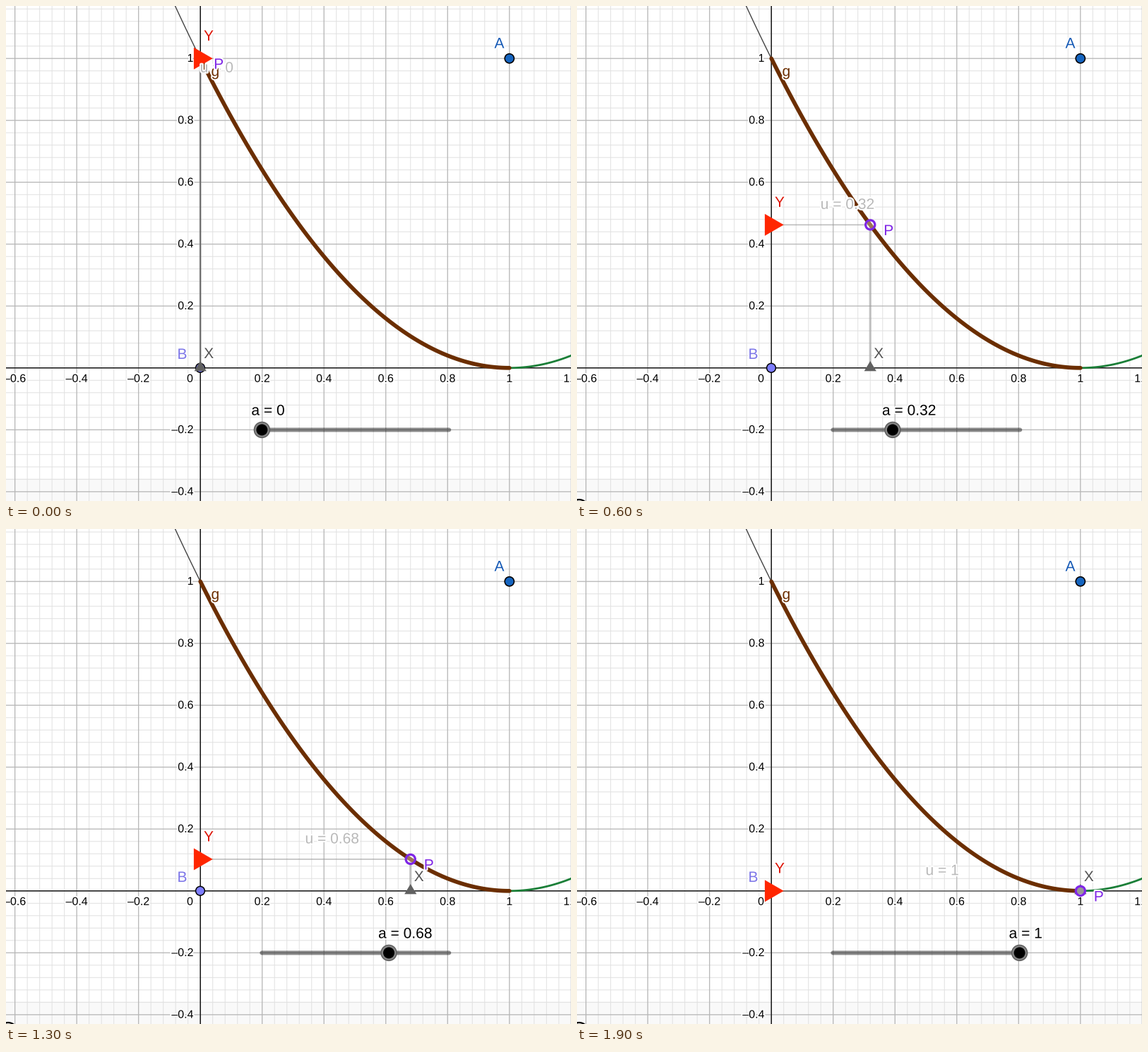
Animation of 800 by 700 pixels, one loop 2 s. Source, as a matplotlib script:

```python
import numpy as np
import matplotlib.pyplot as plt
from matplotlib.animation import FuncAnimation
from matplotlib.patches import Circle, Polygon, Rectangle
from matplotlib.patheffects import withStroke

W, H, DPI = 800, 700, 100
PT = 72 / DPI                        # points per pixel
X0, Y0, UNIT = 275.2, 511.8, 437.6   # origin and scale in pixels
RAIL_Y = 599.4
FRAMES, INTERVAL = 20, 100
BROWN, PURPLE, GREY = "#6b2e00", "#7f26e6", "#616161"

plt.rcParams["font.family"] = "Liberation Sans"
plt.rcParams["text.hinting"] = "none"

fig = plt.figure(figsize=(W / DPI, H / DPI), dpi=DPI, facecolor="white")
ax = fig.add_axes([0, 0, 1, 1])
ax.set_xlim(0, W)
ax.set_ylim(H, 0)
ax.axis("off")


def px(x):
    return X0 + UNIT * x


def py(y):
    return Y0 - UNIT * y


def f(x):
    return (1 - x) ** 2


def line(xs, ys, color, width, z, cap="butt", **kw):
    return ax.plot(xs, ys, color=color, lw=width * PT, zorder=z,
                   solid_capstyle=cap, snap=False, **kw)[0]


def text(x, y, s, color, z, size=21, ha="left", halo=4):
    return ax.text(x, y, s, color=color, fontsize=size * PT, ha=ha,
                   va="baseline", zorder=z,
                   path_effects=[withStroke(linewidth=halo * PT, foreground="white")])


def disc(x, y, r, z, face="none", edge="none", width=0.0):
    return ax.add_patch(Circle((x, y), r, fc=face, ec=edge, lw=width * PT, zorder=z))


def triangle(color, z):
    return ax.add_patch(Polygon([(0, 0)] * 3, closed=True, fc=color, ec="none",
                                zorder=z, snap=False))


def curve(a, b, color, width, z, cap="butt"):
    t = np.linspace(a, b, 120)
    line(px(t), py(f(t)), color, width, z, cap)


# Grid, axes and tick labels
ax.add_patch(Rectangle((0, 668), W, 32, fc="#f9f9f9", ec="none", zorder=0))
for i in range(-16, 32):
    major = i % 5 == 0
    style = ("#b7b7b7", 1.3, 2) if major else ("#e1e1e1", 1, 1)
    gx, gy = px(i * 0.04), py(i * 0.04)
    line([gx, gx], [0, H], *style)
    line([0, W], [gy, gy], *style)
    if major:
        label = f"{round(i * 0.04, 1):g}".replace("-", "\u2013")
        text(gx if i else 260.5, 531.8, label, "black", 5, size=16, ha="center")
        if i:
            text(265.5, gy + 4.7, label, "black", 5, size=16, ha="right")
line([X0, X0], [0, H], "black", 1.3, 4)
line([0, W], [Y0, Y0], "black", 1.3, 4)

# Parabola in three parts
curve(-0.1, 0, "#444444", 1.4, 7)
curve(1, 1.22, "#1b7f38", 2.8, 7)
curve(0, 1, BROWN, 5.7, 8, "round")

# Fixed points and labels
disc(275, Y0, 6.4, 10, "#7d7dff", "black", 1.5)
disc(712.8, py(1), 6.6, 10, "#1565c0", "black", 1.6)
text(242.5, 499, "B", "#7d76e8", 20)
text(691.5, 59.5, "A", "#1559b5", 20)
text(290.5, 99, "g", BROWN, 22)

# Slider rail
line([362.3, 627.3], [RAIL_Y, RAIL_Y], "black", 6, 9, "round", alpha=0.45)

# Moving parts
seg_u = line([], [], "#999999", 1.6, 6, alpha=0.65)
seg_v = line([], [], "#999999", 3.2, 6, alpha=0.55)
mark_x = triangle(GREY, 11)
ring = disc(0, 0, 6.6, 12, (1, 1, 1, 0.35), PURPLE, 3.2)
mark_y = triangle("#ff2600", 13)
lab_u = text(0, 0, "", "#b9b9b9", 21)
lab_x = text(0, 498, "X", "#555555", 20)
lab_y = text(280, 0, "Y", "#dd1508", 20)
lab_p = text(0, 0, "P", PURPLE, 23)
lab_a = text(0, 578.5, "", "black", 20)
knob = [disc(0, RAIL_Y, 11, 14, "#858585", "#5c5c5c", 1.4),
        disc(0, RAIL_Y, 8, 15, "black")]
button = disc(3, 711, 13, 14, edge="black", width=2.2)


def slider_value(i):
    raw = np.interp(i, [0, 2, 6, 9, 11, 15, 19],
                    [0, 0.105, 0.32, 0.48, 0.575, 0.785, 1])
    return round(raw / 0.005) * 0.005


def update(i):
    a = slider_value(i)
    x, y = px(a), py(f(a))
    seg_u.set_data([X0, x], [y, y])
    seg_v.set_data([x, x], [y, Y0])
    mark_x.set_xy([(x - 8.6, 516.3), (x + 8.6, 516.3), (x, 502)])
    mark_y.set_xy([(265.9, y - 15.5), (265.9, y + 15.5), (292.7, y)])
    ring.center = (x, y)

    lab_u.set_text(f"u = {a:.3g}")
    lab_u.set_position(((X0 + x) / 2 - 0.5, y - 22.5 if a else y + 19.5))
    lab_x.set_x(x + 5)
    lab_y.set_y(y - 25.3)
    lab_p.set_position((x + 19, y + 14.6))

    k = 362.4 + 264.2 * a
    lab_a.set_text(f"a = {a:.3g}")
    lab_a.set_x(k - 15)
    for part in knob:
        part.center = (k, RAIL_Y)
    button.set_visible(i > 0)
    return []


anim = FuncAnimation(fig, update, frames=FRAMES, interval=INTERVAL,
                     init_func=lambda: update(0), repeat=True, blit=False)
plt.show()
```
